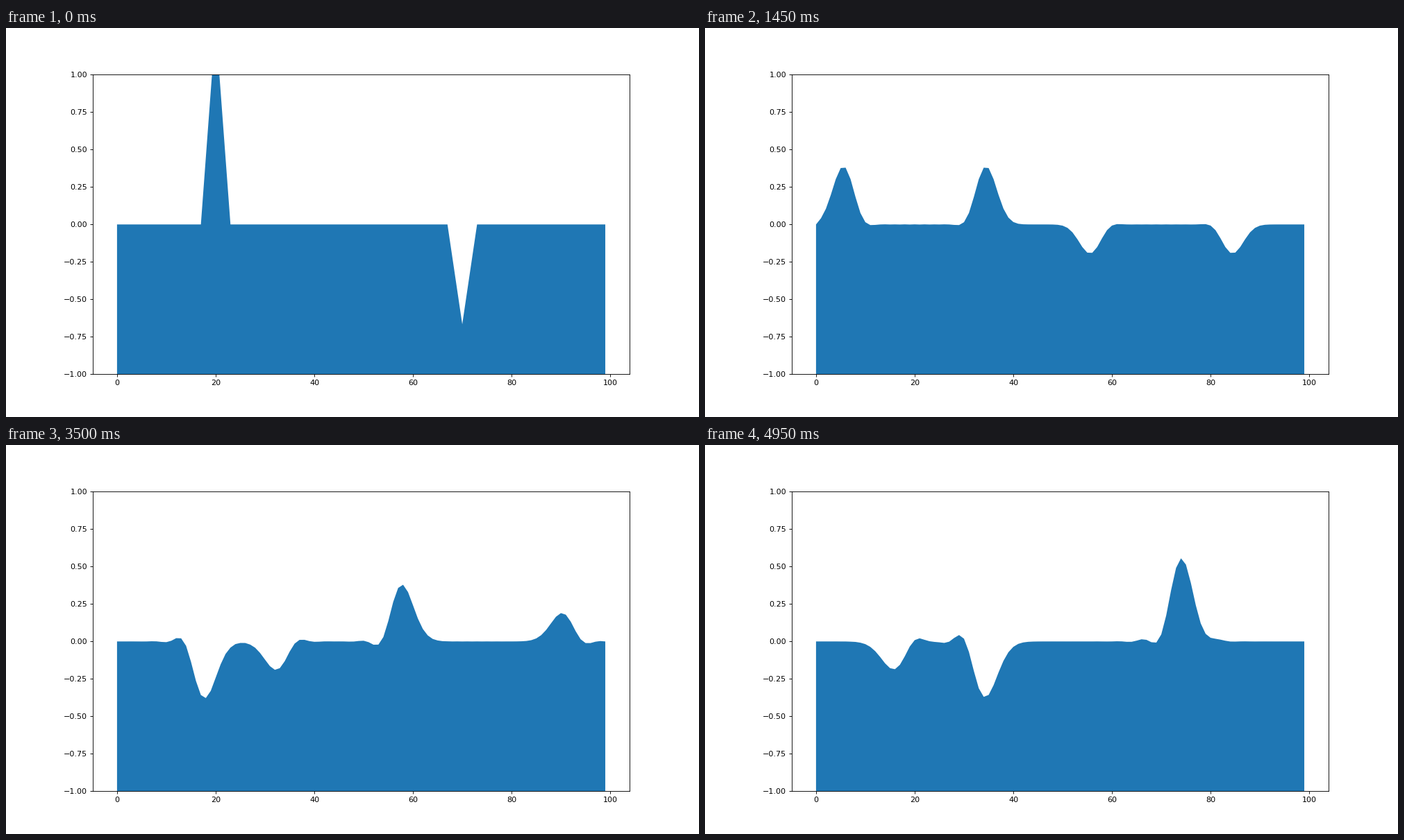
Write a matplotlib script that moves like this. It is 998 px wide and 561 px high and loops after 5 s.

```python
import numpy as np
import matplotlib.pyplot as plt
from matplotlib.animation import FuncAnimation

DPI = 80
CELLS = 100
FRAMES = 100
SMOOTH_FRAMES = 5


def neighbour_mean(u):
    """Three-cell average with both ends held at zero."""
    out = np.zeros_like(u)
    out[1:-1] = (u[:-2] + u[1:-1] + u[2:]) / 3
    return out


def simulate():
    """Spread two impulses first, then let them travel as waves."""
    u = np.zeros(CELLS)
    u[20], u[70] = 4, -2
    u = neighbour_mean(u)
    prev = u
    states = []
    for i in range(FRAMES):
        if i < SMOOTH_FRAMES:
            u = neighbour_mean(u)
            prev = u
        else:
            u, prev = neighbour_mean(u) + u - prev, u
        states.append(u)
    return states


x = np.arange(CELLS)
states = simulate()

fig, ax = plt.subplots(figsize=(998 / DPI, 561 / DPI), dpi=DPI)
# Only a face colour: an edge colour would snap the shape to whole pixels.
water = ax.fill_between(x, states[0], -1, facecolor="#1f77b4")
ax.set_xlim(-4.95, 103.95)
ax.set_ylim(-1, 1)


def update(i):
    surface = np.column_stack([x, states[i]])
    water.set_verts([np.vstack([[0, -1], surface, [CELLS - 1, -1]])])
    return (water,)


anim = FuncAnimation(fig, update, frames=FRAMES, interval=50,
                     repeat=True, repeat_delay=0)
plt.show()
```
